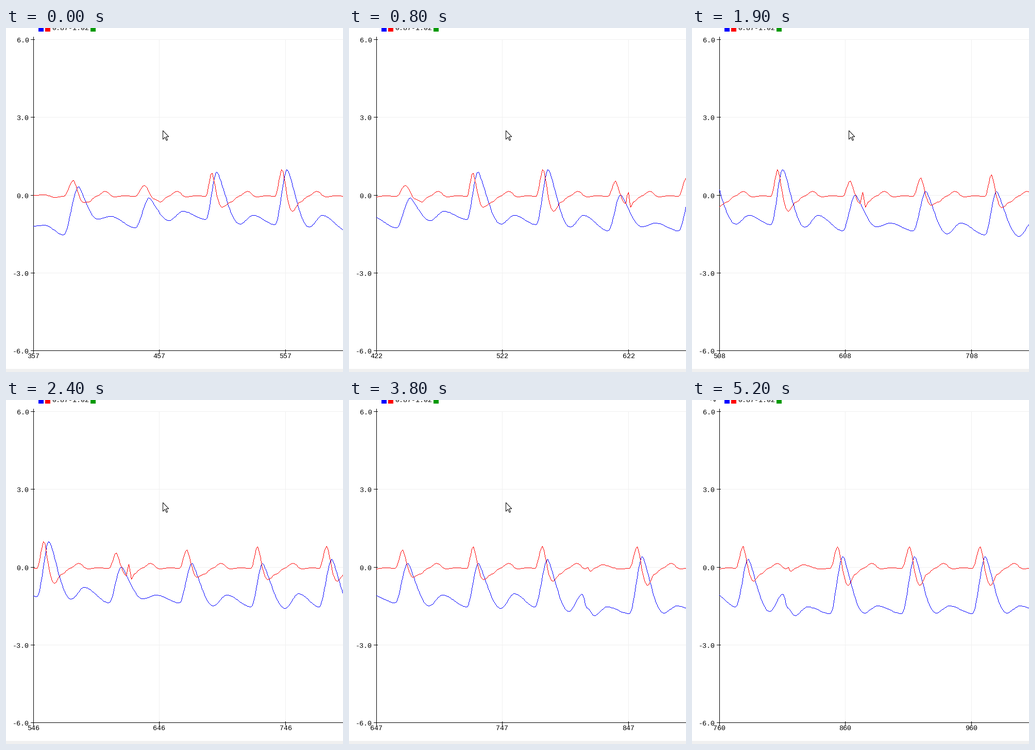
Write a matplotlib script that moves like this. It is 654x669 px and loops after 5400 ms.

```python
import numpy as np
import matplotlib.pyplot as plt
from matplotlib.animation import FuncAnimation
from matplotlib.patches import Polygon, Rectangle

W, H, DPI = 654, 669, 100
PX = 72 / DPI                      # one pixel in points
LEFT, BOTTOM = 53, 627
FIRST, VISIBLE, STEP = 357, 247, 2.445
BLUE, RED = (0, 0, 255, 255), (255, 0, 0, 255)

# One heartbeat per row: onset and rise in samples, then heights in pixels:
# blue base, peak, trough, shoulder; red peak, dip.
BEATS = [
    (381, 12.0, 402, 308, 371, 366, 296, 339),
    (438, 11.0, 388, 330, 374, 356, 306, 332),
    (494, 8.7, 372, 279, 381, 364, 281, 348),
    (549, 9.5, 382, 274, 387, 364, 274, 356),
    (606, 10.0, 394, 324, 386, 379, 297, 341),
    (662, 10.0, 394, 317, 400, 379, 291, 344),
    (719, 9.0, 402, 317, 405, 376, 285, 349),
    (773, 10.0, 402, 309, 411, 377, 284, 352),
]
BEATS += [(onset, 10.2, 415, 304, 414, 400, 285, 360)
          for onset in (848, 905, 961, 1018)]

# Lead-in and the two places where the signal jumps.
blue_knots = [(357, 385), (366, 383), (814.3, 404), (820, 419), (830, 402)]
red_knots = [(357, 325), (366, 324), (374, 329), (621.7, 318), (624, 348),
             (814.7, 325), (816.7, 333), (826, 320), (840, 328)]
for s, rise, base, peak, trough, shoulder, red_peak, dip in BEATS:
    top = s + rise
    blue_knots += [(s, base), (top, peak), (s + 27, trough), (s + 37.5, shoulder)]
    red_knots += [(s, 327), (top - 4, red_peak), (top + 4, dip), (s + 20, 338),
                  (s + 26, 327), (s + 33, 317), (s + 40, 328), (s + 48, 326)]


def trace(knots):
    """Ease from knot to knot; deep falls start faster than they end."""
    x, y = np.array(sorted(knots)).T
    n = np.arange(FIRST, 1010)
    i = np.searchsorted(x, n, side="right") - 1
    drop = y[i + 1] - y[i]
    t = ((n - x[i]) / (x[i + 1] - x[i])) ** np.where(drop > 35, 0.75, 1)
    return np.round(y[i] + drop * t * t * (3 - 2 * t)).astype(int)


blue, red = trace(blue_knots), trace(red_knots)

# When each block of samples reaches the screen, in tenths of a second.
UPDATES = np.array([1, 3, 5, 6, 8, 10, 11, 13, 15, 16, 18, 19, 21, 22, 24,
                    30, 30, 30, 32, 32, 35, 36, 38, 40, 41, 43, 44, 46,
                    49, 49, 52, 52])
POINTER_PATH = [(0, 304, 199), (40, 262, 159), (41, 168, 91),
                (43, 40, -3), (44, 37, -12), (46, 36, -17)]
POINTER = np.array([(0.5, 0.5), (0.5, 17.5), (4.5, 13.5), (7.3, 19.7),
                    (9.5, 18.7), (6.8, 12.5), (11.8, 12.5)])


def first_sample(tenth):
    done = np.sum(UPDATES <= tenth)
    return int(round(np.interp(done, [0, 5, 12, 26, 32],
                               [FIRST, 422, 508, 685, 760])))


fig = plt.figure(figsize=(W / DPI, H / DPI), dpi=DPI, facecolor="white")
ax = fig.add_axes([0, 0, 1, 1])
ax.axis("off")


def box(x0, y0, x1, y1, color, z=1):
    ax.add_patch(Rectangle((x0, y0), x1 - x0, y1 - y0, fc=color, lw=0,
                           antialiased=False, zorder=z))


def label(x, y, text, align):
    return ax.text(x, y, text, ha=align, va="baseline", color="black",
                   family="Liberation Mono", size=13.33 * PX, zorder=5)


box(0, 663, W, H, "#f0f0f0")
TICKS_X = (53, 297, 542)
for y, text in zip((22, 173, 325, 476, 627),
                   ("6.0", "3.0", "0.0", "-3.0", "-6.0")):
    box(LEFT, y, W, y + 1, "#f0f0f0")
    box(48, y, 56, y + 1, "black", 2)
    label(44.5, y + 6, text, "right")
for x in TICKS_X:
    box(x, 22, x + 1, BOTTOM, "#f0f0f0")
    box(x, 625, x + 1, 633, "black", 2)
box(LEFT, 17, LEFT + 1, 633, "black", 2)
box(48, BOTTOM, W, BOTTOM + 1, "black", 2)

for x, color in ((63, "#0000ff"), (76, "#ff0000"), (164, "#009900")):
    box(x, -4, x + 10, 7, color)
label(89, 4, "0.87-1.02", "left")

numbers = [label(x + 0.5, 642, "", "center") for x in TICKS_X]
plot = ax.imshow(np.zeros((H, W, 4), np.uint8), extent=(0, W, H, 0),
                 aspect="auto", interpolation="nearest", zorder=3)
ax.set(xlim=(0, W), ylim=(H, 0))
pointer = ax.add_patch(Polygon(POINTER, closed=True, fc="white", ec="black",
                               lw=PX, joinstyle="miter", zorder=9))
screen_x = (LEFT + STEP * np.arange(VISIBLE)).astype(int)


def stroke(canvas, ys, color):
    """Join the samples with crisp lines one pixel wide."""
    for x0, y0, x1, y1 in zip(screen_x, ys, screen_x[1:], ys[1:]):
        count = max(x1 - x0, abs(y1 - y0)) + 1
        px = np.rint(np.linspace(x0, x1, count)).astype(int)
        py = np.rint(np.linspace(y0, y1, count)).astype(int)
        inside = px < W
        canvas[py[inside], px[inside]] = color


def draw(tenth):
    start = first_sample(tenth)
    part = slice(start - FIRST, start - FIRST + VISIBLE)
    canvas = np.zeros((H, W, 4), np.uint8)
    stroke(canvas, blue[part], BLUE)
    stroke(canvas, red[part], RED)
    plot.set_data(canvas)
    for i, number in enumerate(numbers):
        number.set_text(str(start + 100 * i))
    _, x, y = [p for p in POINTER_PATH if p[0] <= tenth][-1]
    pointer.set_xy(POINTER + (x, y))
    return [plot, pointer, *numbers]


anim = FuncAnimation(fig, draw, frames=54, interval=100, repeat=True,
                     repeat_delay=0, blit=False)
plt.show()
```
